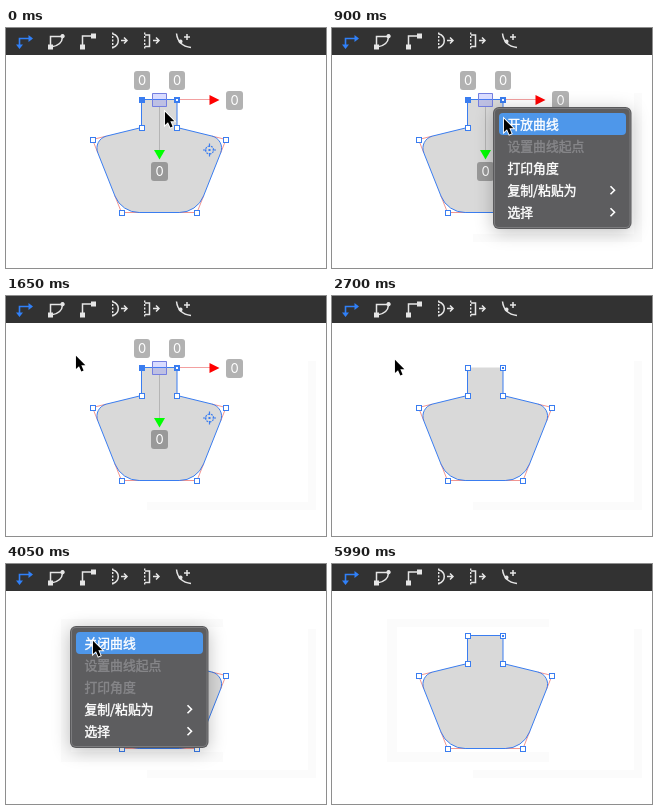
Animation, 320 px wide and 240 px high, one loop 6.86 s. Source, as an HTML page with a canvas:

```html
<!DOCTYPE html>
<html lang="zh">
<head>
<meta charset="utf-8">
<style>
html, body { margin: 0; width: 100%; height: 100%; overflow: hidden; background: #fff; }
canvas { display: block; width: 320px; height: 240px; }
</style>
</head>
<body>
<canvas id="stage"></canvas>
<script>
const LOOP = 6860;
const BLUE = '#3a7df0', RED = '#ee7a74', LIGHT = '#e6e6e6';
const FONT = '"Noto Sans CJK SC", "Noto Sans CJK", sans-serif';
const canvas = document.getElementById('stage');
const ctx = canvas.getContext('2d');
const ratio = window.devicePixelRatio || 1;
canvas.width = 320 * ratio;
canvas.height = 240 * ratio;
ctx.scale(ratio, ratio);

// Start time and tip position of each cursor pose.
const cursorSteps = [
  [0, 158, 83], [750, 167, 89], [900, 171, 90], [1650, 69, 59],
  [1800, 51, 58], [2400, 53, 59], [2550, 54, 60], [2700, 62, 63],
  [3750, 69, 65], [3900, 86, 76], [4940, 86, 75], [5840, 99, 96]
];
const outline = [[136, 72], [136, 100], [87, 112], [116, 185], [191.5, 185], [220.5, 112], [171.5, 100], [171.5, 72]];
const cornerRadius = [0, 0, 12.5, 26, 26, 12.5, 0, 0];
const labels = ['开放曲线', '设置曲线起点', '打印角度', '复制/粘贴为', '选择'];

function rect(x, y, w, h, fill) {
  ctx.fillStyle = fill;
  ctx.fillRect(x, y, w, h);
}

function roundRect(x, y, w, h, r, fill) {
  ctx.beginPath();
  ctx.roundRect(x, y, w, h, r);
  ctx.fillStyle = fill;
  ctx.fill();
}

function stroke(path, color, width = 1, dash = []) {
  ctx.strokeStyle = color;
  ctx.lineWidth = width;
  ctx.setLineDash(dash);
  ctx.stroke(new Path2D(path));
  ctx.setLineDash([]);
}

function fill(path, color) {
  ctx.fillStyle = color;
  ctx.fill(new Path2D(path));
}

function toolbar() {
  rect(0, 0, 320, 27, '#323232');
  stroke('M13.5 17V10.5H23', '#3080f8', 1.6);
  fill('M22.5 7L27 10.5L22.5 14ZM10 16.5H17L13.5 21Z', '#3080f8');

  stroke('M44.5 18V8.5H55', LIGHT, 1.5);
  stroke('M45 19Q56 17.5 56.5 9', LIGHT, 1.5);
  rect(42, 16.5, 5, 5, LIGHT);
  fill('M56.5 6a2.2 2.2 0 1 0 .1 0Z', LIGHT);

  stroke('M76.5 18V8H87', LIGHT, 1.5);
  rect(74, 16.5, 5, 5, LIGHT);
  rect(85, 5.5, 5, 5, LIGHT);

  for (const [x, bracket] of [[106, 'M107 6C114 8 114 17 107 19.5'], [138, 'M139 7H143.5V18.5H139']]) {
    stroke(`M${x + .7} 4.5V21`, LIGHT, 1.4, [2, 1.5]);
    stroke(bracket, LIGHT, 1.5);
    stroke(`M${x + 9} 12.5H${x + 15}M${x + 12} 9.5L${x + 15} 12.5L${x + 12} 15.5`, LIGHT, 1.5);
  }

  stroke('M170.5 5.5Q172 18 185 19.5', LIGHT, 1.5);
  stroke('M181 6V12M178 9H184', LIGHT, 1.5);
  fill('M174.5 11.5a2 2 0 1 0 .1 0Z', LIGHT);
}

function pointBox([x, y], filled) {
  x = Math.floor(x);
  rect(x - 3, y - 3, 6, 6, BLUE);
  if (!filled) rect(x - 2, y - 2, 4, 4, '#fff');
}

function bottle(closed, selected) {
  ctx.save();
  ctx.translate(-.5, -.5);
  ctx.beginPath();
  outline.forEach(([x, y], i) => {
    if (!i) ctx.moveTo(x, y);
    else if (cornerRadius[i]) ctx.arcTo(x, y, ...outline[i + 1], cornerRadius[i]);
    else ctx.lineTo(x, y);
  });
  if (closed) ctx.closePath();
  ctx.fillStyle = '#d9d9d9';
  ctx.fill();
  stroke('M101 108.6L87 112L92.3 125.4M109.3 168.2L116 185H134M173.5 185H191.5L198.2 168.2M215.2 125.4L220.5 112L206.5 108.6', RED, .8);
  ctx.strokeStyle = BLUE;
  ctx.lineWidth = 1;
  ctx.stroke();
  ctx.restore();

  outline.forEach((point, i) => pointBox(point, selected && (i === 0 || i === 7)));
  rect(170, 71, 2, 2, selected ? '#fff' : BLUE);
}

function badge(x, y, w, color) {
  roundRect(x, y, w, 19, 3, color);
  ctx.fillStyle = '#fff';
  ctx.font = '13px Inter, sans-serif';
  ctx.textAlign = 'center';
  ctx.fillText('0', x + w / 2, y + 10);
}

function manipulator() {
  stroke('M153.5 79V122', '#b5b5b5');
  stroke('M174 71.5H204', '#f3a0a0');
  fill('M203.5 67L213.5 72L203.5 77Z', '#f00');
  fill('M148 122H159L153.5 131.5Z', '#0f0');
  rect(146, 65, 15, 14, 'rgba(110,115,255,.25)');
  stroke('M146.5 65.5H160.5V78.5H146.5Z', '#747fe0');
  badge(128, 43, 16, '#b2b2b2');
  badge(163, 43, 16, '#b2b2b2');
  badge(220, 63, 17, '#b2b2b2');
  badge(145, 134, 17, '#999');
  stroke('M203.5 118a4 4 0 1 0 .1 0Z', BLUE, 1.2, [2, 1]);
  stroke('M203.5 115.5V119M203.5 125V128.5M197 122H200.5M206.5 122H210', BLUE, 1.2);
  rect(202.5, 121, 2, 2, BLUE);
}

function menu(x, y, first, disabled, highlighted, alpha) {
  ctx.save();
  ctx.globalAlpha = alpha;
  ctx.shadowColor = 'rgba(0,0,0,.25)';
  ctx.shadowBlur = 18 * ratio;
  ctx.shadowOffsetY = 3 * ratio;
  roundRect(x, y, 138.5, 122, 6, '#5a5a5c');
  ctx.shadowColor = 'transparent';
  roundRect(x + 1, y + 1, 136.5, 120, 5, '#7c7c7e');
  roundRect(x + 2, y + 2, 134.5, 118, 4, '#5d5d5f');
  if (highlighted) roundRect(x + 6, y + 6, 127, 22, 4, '#4e97ea');
  ctx.font = `12.8px ${FONT}`;
  ctx.textAlign = 'left';
  labels.forEach((label, i) => {
    const cy = y + 17.2 + 22 * i;
    const text = i ? label : first;
    ctx.fillStyle = ctx.strokeStyle = disabled.includes(i) ? '#87878a' : '#fff';
    ctx.lineWidth = .4;
    ctx.fillText(text, x + 14.5, cy);
    ctx.strokeText(text, x + 14.5, cy);
    if (i > 2) stroke(`M${x + 117.5} ${cy - 4}l4 4l-4 4`, '#fff', 1.6);
  });
  ctx.restore();
}

function cursor(t) {
  const [, x, y] = cursorSteps.findLast(step => step[0] <= t);
  ctx.save();
  ctx.translate(x + .5, y + .3);
  ctx.scale(.9, .92);
  const arrow = 'M.5 .5V15L3.9 11.8L6.5 17.6L9 16.5L6.5 10.9H11Z';
  stroke(arrow, '#fff', 2);
  fill(arrow, '#000');
  ctx.restore();
}

function draw(t) {
  const between = (from, to) => t >= from && t < to;
  rect(0, 0, 320, 240, '#fff');
  ctx.textBaseline = 'middle';

  // Faint edges that the menu shadows leave behind.
  if (t >= 300) {
    rect(302, 65, 8, 149, '#fbfbfb');
    rect(141, 206, 161, 8, '#fbfbfb');
  }
  if (t >= 3150) {
    rect(55, 55, 162, 8, '#fbfbfb');
    rect(55, 63, 10, 135, '#fbfbfb');
    rect(65, 188, 152, 10, '#fbfbfb');
  }

  toolbar();
  bottle(!between(1800, 4790), t < 2250);
  if (t < 2250) manipulator();
  if (between(300, 1650)) menu(161, 79, '开放曲线', [1], between(750, 1500), t < 1500 ? 1 : .02);
  if (between(3150, 4790)) menu(64, 62, '关闭曲线', [1, 2], between(3900, 4650), t < 4650 ? 1 : .02);
  if (t < 5990) cursor(t);
}

const start = performance.now();
function tick() {
  draw((performance.now() - start) % LOOP);
  requestAnimationFrame(tick);
}
tick();
</script>
</body>
</html>
```
